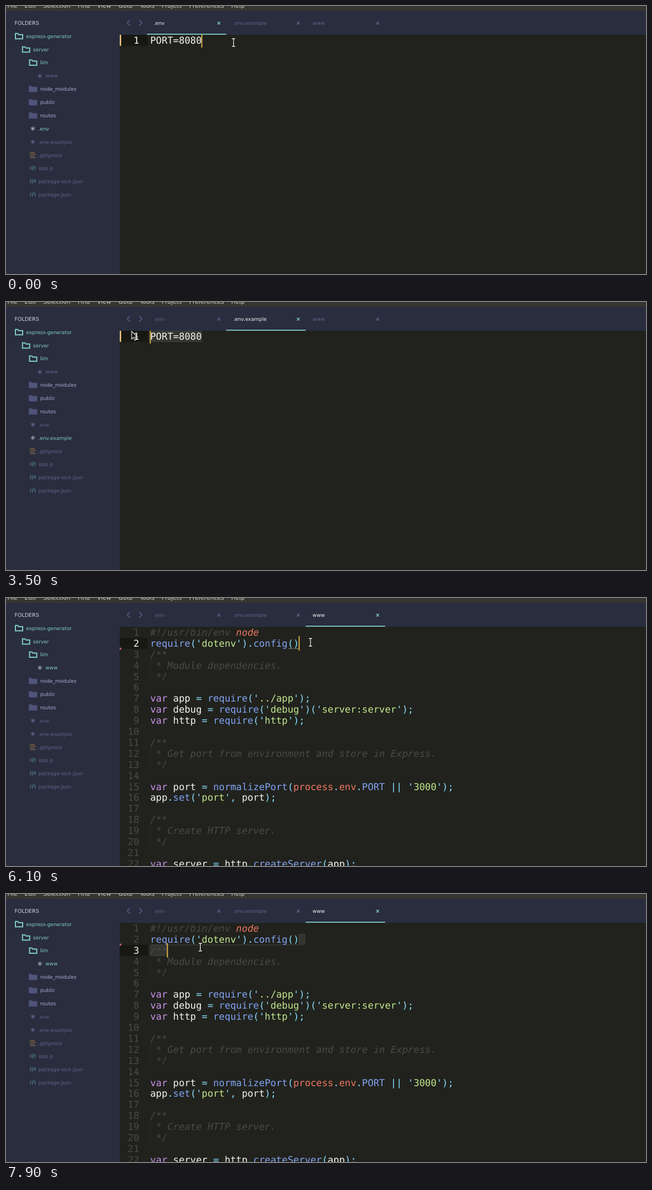
An HTML page for the animation above (8 s loop, 1156x484 px).

```html
<!DOCTYPE html>
<html lang="en">
<head>
<meta charset="utf-8">
<title>Code editor</title>
<style>
html, body { margin: 0; width: 100%; height: 100%; overflow: hidden; background: #21221d; }
svg { display: block; width: 1156px; height: 484px; }
text { white-space: pre; text-rendering: geometricPrecision; font: 9px "DejaVu Sans", sans-serif; }
.code { font: 17.18px "DejaVu Sans Mono", monospace; }
.menu { font-size: 10.7px; word-spacing: 9.7px; }
.head { font-size: 9.5px; }
.note { font-style: italic; }
</style>
</head>
<body>
<svg id="stage" viewBox="0 0 1156 484"></svg>
<script>
const stage = document.getElementById('stage');
const LEFT = 260.5, CHAR = 10.343, TOP = 52, LINE = 19.9, GUTTER = 256;
const C = {
  back: '#21221d', bar: '#292d3e', teal: '#80cbc4', dim: '#60658a', folder: '#50557c', label: '#a6accd',
  white: '#f3f5ef', note: '#494a45', key: '#c792ea', call: '#82a4f5', red: '#ee7863', str: '#c3e88d',
  punct: '#89ddff', caret: '#f3c450', edge: '#44453f'
};

const source = `#!/usr/bin/env node
require('dotenv').config()
/**
 * Module dependencies.
 */

var app = require('../app');
var debug = require('debug')('server:server');
var http = require('http');

/**
 * Get port from environment and store in Express.
 */

var port = normalizePort(process.env.PORT || '3000');
app.set('port', port);

/**
 * Create HTTP server.
 */

var server = http.createServer(app);`.split('\n');

const files = ['.env', '.env.example', 'www'];

// Indent is the depth, the first word the icon
const tree = `open express-generator
 open server
  open bin
   star www
  dir node_modules
  dir public
  dir routes
  star .env
  star .env.example
  list .gitignore
  tag app.js
  tag package-lock.json
  tag package.json`.split('\n');

// Pointer moves: [start, end, x, y], times in tenths of a second
const home = [411, 66];
const moves = [
  [4, 6, 372, 62], [7, 8, 215, 50], [13, 16, 372, 82], [16, 22, 434, 38],
  [24, 26, 447, 68], [27, 30, 255, 45], [31, 32, 225, 48], [34, 35, 227, 53],
  [36, 42, 430, 84], [42, 48, 533, 37], [49, 53, 562, 33], [54, 59, 457, 88],
  [59, 61, 550, 80], [65, 73, 279, 92], [75, 76, 290, 86], [76, 79, 351, 96]
];

const rect = (x, y, w, h, fill, extra = '') => `<rect x="${x}" y="${y}" width="${w}" height="${h}" fill="${fill}" ${extra}/>`;
const line = (d, color, w = 1, fill = 'none') => `<path d="${d}" stroke="${color}" stroke-width="${w}" fill="${fill}"/>`;
const text = (x, y, s, fill, cls = '', extra = '') => `<text x="${x}" y="${y}" fill="${fill}" class="${cls}" ${extra}>${s}</text>`;
const span = (s, color) => `<tspan fill="${color}">${s}</tspan>`;
const colX = col => LEFT + col * CHAR;
const rowY = row => TOP + (row - 1) * LINE;
const baseY = row => rowY(row) + 15.9;

function pointer(step) {
  let [x, y] = home;
  for (const [start, end, toX, toY] of moves) {
    if (step <= start) break;
    const k = 1 - (1 - Math.min(1, (step - start) / (end - start))) ** 2;
    x += (toX - x) * k;
    y += (toY - y) * k;
  }
  return [x, y];
}

function highlight(s) {
  const token = /(var)|(require|normalizePort|config|set|createServer|PORT)|(process|env)|'([^']*)'|([=().;,|]+)/g;
  return s.replace(token, (m, key, call, red, str) =>
    key ? span(m, C.key) : call ? span(m, C.call) : red ? span(m, C.red) :
    str ? span("'", C.punct) + span(str, C.str) + span("'", C.punct) : span(m, C.punct));
}

function codeLine(s, i) {
  const row = i + 1;
  if (!/^ ?[#*/]/.test(s)) return text(LEFT, baseY(row), highlight(s), C.white, 'code');
  const guide = s[0] === ' ' ? rect(LEFT, rowY(row), 1, LINE, '#2c2d28') : '';
  return guide + text(LEFT, baseY(row), s.replace('node', span('node', C.red)), C.note, 'code note');
}

const listing = source.map(codeLine).join('');

function selection(row, from, to) {
  return from < to ? rect(colX(from), rowY(row) + .5, (to - from) * CHAR, LINE - 1, '#343530', `rx="2" stroke="${C.edge}"`) : '';
}

function editor(step, tab, [x, y]) {
  const near = max => Math.max(0, Math.min(max, Math.round((x - LEFT) / CHAR)));
  const drag = step > 65;
  let row = 1, col = 9, count = 1, marks, body;
  if (tab < 2) {
    if (step >= 6 && step < 14) col = 0;
    if (step >= 28 && step < 37) col = near(9);
    marks = selection(1, col, 9);
    body = text(LEFT, baseY(1), 'PORT=8080', C.white, 'code');
  } else {
    row = drag && y >= 92 ? 3 : 2;
    col = drag ? near(row === 3 ? 3 : 26) : 26;
    count = source.length;
    marks = row === 2 ? selection(2, col, 26) :
      selection(2, 26, 27) + selection(3, 0, col) + line(`M${LEFT} 91.9H${colX(26)}`, C.edge);
    body = listing + (drag ? '' : line('M510 91.3h8M520 91.3h8', '#8a9a98'));
  }
  let numbers = '';
  for (let n = 1; n <= count; n++)
    numbers += text(240.5, baseY(n), n, n === row ? C.white : C.note, 'code', 'text-anchor="end"');
  return rect(205, rowY(row), GUTTER - 205, LINE, '#171812') + marks + numbers + body +
    rect(colX(col) - .8, rowY(row) - 3, 1.7, 26, C.caret);
}

function gutterMark(tab) {
  return tab < 2 ? rect(205.5, TOP, 2.5, LINE, '#f5c77e') : line('M205.5 88.5l3.5 3l-3.5 3z', 'none', 0, '#d0607a');
}

const icons = {
  open: (x, y) => line(`M${x + 1} ${y - 4.5}h4.5l1.5 2h7v7.5h-13z`, C.teal, 2),
  dir: (x, y) => line(`M${x} ${y - 5}h5.5l1.5 1.5h7.5v9h-14.5z`, C.folder, .6, C.folder),
  star: (x, y, on) => line(`M${x + 7} ${y - 4}v8m-3.5 -6l7 4m-7 0l7 -4`, on ? '#98a9b6' : C.dim, 1.2),
  list: (x, y) => line(`M${x + 1.5} ${y - 4.5}h9m-9 3h11m-11 3h9m-9 3h11`, '#8d6c49', 1.2),
  tag: (x, y) => line(`M${x + 4.5} ${y - 3.5}l-2.5 3l2.5 3m5 -6l2.5 3l-2.5 3m-1.5 -7l-2 8`, '#55919a', 1.1)
};

function sidebar(tab) {
  return rect(0, 8, 205.5, 476, C.bar) + text(15.5, 33.5, 'FOLDERS', '#d3d6e2', 'head') +
    tree.map((entry, i) => {
      const [kind, name] = entry.trim().split(' ');
      const x = 16 + entry.search(/\S/) * 12.75, y = 54.3 + i * 23.87;
      const on = name === files[tab], isDir = kind === 'dir';
      const color = kind === 'open' || on ? C.teal : isDir ? C.label : C.dim;
      return icons[kind](x, y, on) + text(x + (isDir || kind === 'open' ? 20.3 : 17), y + 3.4, name, color);
    }).join('');
}

function tabs(active) {
  return rect(205, 8, 951, TOP - 8, C.bar) +
    line('M224 25l-5 5.3l5 5.3M240.5 25l5 5.3l-5 5.3', C.folder, 1.8) +
    files.map((name, i) => {
      const x = 254.5 + i * 143.4, on = i === active;
      return text(x + 12.5, 33.7, name, on ? C.white : C.dim) +
        line(`M${x + 127.5} 28.5l5 5m0 -5l-5 5`, on ? C.teal : C.dim, 1.2) +
        (on ? rect(x, 50, 143.4, 1.8, C.teal) : '');
    }).join('');
}

const menu = rect(0, 0, 1156, 8.5, '#353631') +
  text(2.5, 3, 'File Edit Selection Find View Goto Tools Project Preferences Help', '#d8d9d2', 'menu');

function cursor([x, y]) {
  if (x < GUTTER || y < TOP)
    return line(`M${x} ${y}v14l3.4 -3.1l2.3 5.2l2.4 -1.1l-2.3 -5h4.5z`, '#f4f4f4', 1.1, '#111');
  const beam = `M${x - 3} ${y - 7}h2l1 1l1 -1h2M${x} ${y - 6}v12M${x - 3} ${y + 7}h2l1 -1l1 1h2`;
  return line(beam, '#0c0c0a', 3.2) + line(beam, '#f4f4f4', 1.4);
}

let shown = -1;
function frame() {
  const step = Math.floor(performance.now() % 8000 / 100);
  if (step !== shown) {
    shown = step;
    const tab = step < 20 ? 0 : step < 50 ? 1 : 2, at = pointer(step);
    stage.innerHTML = rect(0, 0, 1156, 484, C.back) + editor(step, tab, at) +
      sidebar(tab) + tabs(tab) + menu + gutterMark(tab) + cursor(at);
  }
  requestAnimationFrame(frame);
}
frame();
</script>
</body>
</html>
```
